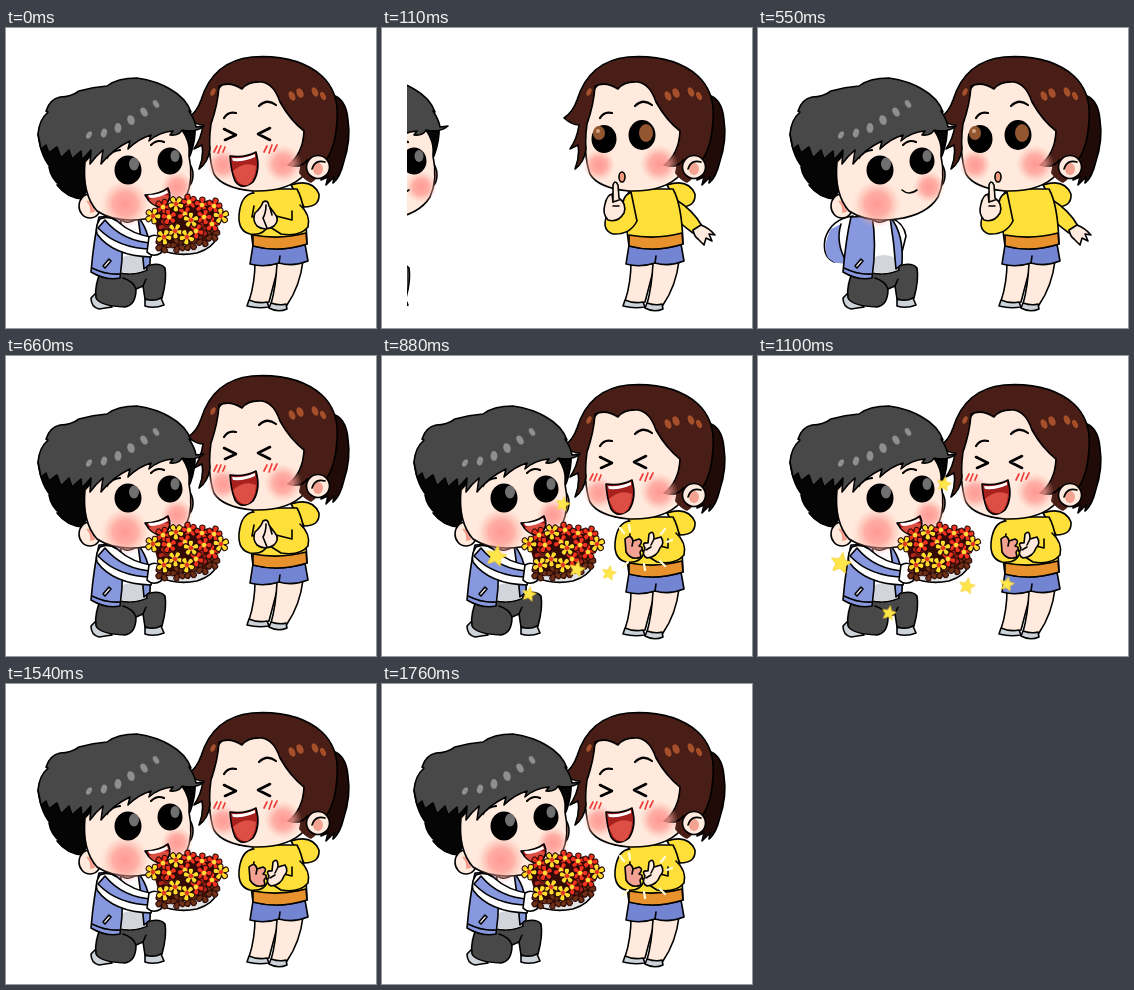
An HTML page for the animation above (1870 ms loop, 370 by 300 pixels).

```html
<!DOCTYPE html>
<html lang="en">
<head>
<meta charset="utf-8">
<title>A bouquet for her</title>
<style>
html, body { margin: 0; width: 100%; height: 100%; overflow: hidden; background: #fff; }
svg { display: block; width: 370px; height: 300px; }
path, ellipse, circle { stroke-linejoin: round; stroke-linecap: round; }
.ink { stroke: #000; stroke-width: 1.6; }
.line { fill: none; stroke: #000; stroke-width: 1.6; }
.bold { fill: none; stroke: #000; stroke-width: 2.2; }
.skin { fill: #ffeadd; }
.blue { fill: #8798df; }
.white { fill: #fff; }
.pants { fill: #484848; }
.shoe { fill: #cdd3d9; }
.yellow { fill: #ffe03b; }
.orange { fill: #e8922e; }
.mouth { fill: #a8211e; }
.tongue { fill: #dd4f45; }
.pink { fill: #f3a191; }

/* 17 poses of 110 ms each */
.ask, .joy, .slide, .hop, .open, .shut, .spark, .ghost { animation: 1.87s step-end infinite; }
.ask { animation-name: ask; }
.joy { animation-name: joy; }
.slide { animation-name: slide; }
.hop { animation-name: hop; }
.open { animation-name: open; }
.shut { animation-name: shut; }
.spark { animation-name: spark; }
.ghost { animation-name: ghost; }
.star { animation: fly 1.87s steps(6) infinite, starTime 1.87s step-end infinite; fill: #ffe64a; }
@keyframes ask { 0%, 35.29% { visibility: hidden; } 5.88% { visibility: visible; } }
@keyframes joy { 0%, 35.29% { visibility: visible; } 5.88% { visibility: hidden; } }
@keyframes slide {
  0%, 29.41% { transform: none; }
  5.88% { transform: translateX(-132px); }
  11.76% { transform: translateX(-99px); }
  17.64% { transform: translateX(-66px); }
  23.52% { transform: translateX(-33px); }
}
@keyframes hop { 0%, 41.17% { transform: none; } 35.29% { transform: translateY(-9px); } }
@keyframes open {
  0%, 41.17%, 52.94%, 64.7%, 76.47%, 88.23% { visibility: hidden; }
  47.05%, 58.82%, 70.58%, 82.35%, 94.11% { visibility: visible; }
}
@keyframes shut {
  0%, 35.29%, 52.94%, 64.7%, 76.47%, 88.23% { visibility: visible; }
  5.88%, 47.05%, 58.82%, 70.58%, 82.35%, 94.11% { visibility: hidden; }
}
@keyframes spark {
  0%, 52.94%, 76.47% { visibility: hidden; }
  47.05%, 70.58%, 94.11% { visibility: visible; }
}
@keyframes ghost { 0%, 76.47% { visibility: hidden; } 70.58% { visibility: visible; } }
@keyframes starTime { 0%, 70.58% { visibility: hidden; } 41.17% { visibility: visible; } }
@keyframes fly {
  0%, 35.29% { transform: none; }
  70.58%, 100% { transform: translate(var(--dx), var(--dy)); }
}
</style>
</head>
<body>
<svg viewBox="0 0 370 300">
  <defs>
    <radialGradient id="blush">
      <stop offset="0" stop-color="#ff8f8a" stop-opacity=".9"/>
      <stop offset=".5" stop-color="#ff9b94" stop-opacity=".75"/>
      <stop offset="1" stop-color="#ffb5a8" stop-opacity="0"/>
    </radialGradient>
    <clipPath id="edge"><path d="M25 0H370V300H25Z"/></clipPath>
    <path id="star" d="M0-8 2.3-2.8 8-2.2 3.8 1.5 5 7 0 4.2-5 7-3.8 1.5-8-2.2-2.3-2.8Z"/>
  </defs>

  <g class="hop">
    <!-- girl: ponytail, legs -->
    <path class="ink" fill="#210b08" d="M326 67Q340 70 342 92Q345 112 338 133Q334 150 327 155L328 149L320 157L322 149L315 152Q321 142 318 122Z"/>
    <path class="ink skin" d="M249 234Q249 255 243 273Q252 279 263 274L273 236Z"/>
    <path class="ink skin" d="M271 235Q270 258 265 276Q273 281 281 277Q294 258 297 233Z"/>
    <path class="ink shoe" d="M243 272Q252 276 261 274L263 279Q252 281 241 278Z"/>
    <path class="ink shoe" d="M265 275Q274 278 280 276L281 281Q272 285 263 280Z"/>
    <path class="ink" fill="#7284d2" d="M247 217L299 216L302 233Q287 239 273 235Q258 240 244 236Z"/>
    <path class="line" d="M273 235L274 228"/>
    <!-- hoodie -->
    <path class="ink yellow" d="M285 157Q306 150 313 166Q314 179 298 179Z"/>
    <g class="ask">
      <path class="ink yellow" d="M293 171Q311 182 320 198L311 205Q300 197 293 190Z"/>
      <path class="ink skin" d="M311 202L319 197Q327 200 333 207L327 206L330 213L324 210L322 217L316 211Q312 208 311 202Z"/>
    </g>
    <path class="ink yellow" d="M247 161L291 161Q300 177 301 216Q273 225 247 218Q242 190 247 161Z"/>
    <path class="ink orange" d="M247 207Q274 212 300 205L301 216Q273 225 247 218Z"/>
    <!-- head -->
    <path class="ink skin" d="M204 92Q201 126 208 146Q216 160 247 163Q283 164 299 146L303 90Q280 44 240 46Q205 50 204 92Z"/>
    <path d="M296 128L318 126L309 152L305 155Q298 152 293 145Z" fill="#481e16"/>
    <path class="ink" fill="#481e16" d="M182 90Q191 84 195 72Q207 33 246 29Q291 26 316 48Q333 64 331 91Q330 118 320 132L301 132Q296 141 282 137Q297 126 298 103Q284 92 274 74Q268 56 256 54Q242 53 236 61Q224 53 213 58Q212 76 205 96Q203 110 204 121Q202 135 193 141Q198 129 196 117L188 121Q195 111 197 97Q190 97 182 90Z"/>
    <ellipse class="ink skin" cx="312" cy="139" rx="11.5" ry="11.5"/>
    <ellipse class="pink" cx="312" cy="141" rx="5" ry="6"/>
    <path class="line" d="M306 141Q309 131 319 134"/>
    <g fill="#a5502b">
      <ellipse cx="207" cy="64" rx="2.2" ry="4" transform="rotate(25 207 64)"/>
      <ellipse cx="286" cy="68" rx="3" ry="5" transform="rotate(-25 286 68)"/>
      <ellipse cx="294" cy="65" rx="3.3" ry="5" transform="rotate(-25 294 65)"/>
      <ellipse cx="309" cy="64" rx="3" ry="5" transform="rotate(-25 309 64)"/>
      <ellipse cx="317" cy="68" rx="2.5" ry="4.5" transform="rotate(-25 317 68)"/>
    </g>
    <path class="bold" d="M218 90Q222 83 230 85M253 78Q261 70 270 77"/>
    <circle cx="217" cy="137" r="16" fill="url(#blush)"/>
    <circle cx="277" cy="136" r="19" fill="url(#blush)"/>

    <g class="ask">
      <ellipse cx="222" cy="111" rx="12.5" ry="14"/>
      <ellipse cx="260" cy="107" rx="13.5" ry="15"/>
      <ellipse cx="217" cy="105" rx="6" ry="7" fill="#925630"/>
      <ellipse cx="264" cy="105" rx="7" ry="9" fill="#925630"/>
      <circle cx="216" cy="103" r="2" fill="#d5a27c"/>
      <ellipse class="ink" cx="240" cy="149" rx="3" ry="5" fill="#f09a7e"/>
      <path class="ink yellow" d="M249 164Q239 169 241 181L225 187Q219 202 231 206Q248 207 255 193Z"/>
      <path class="ink skin" d="M231 174L231 157Q233 151 236 157L237 170Q245 176 242 185Q236 195 226 192Q220 186 223 176Q225 167 230 166Z"/>
      <path class="line" d="M231 174L237 172M231 178L237 178"/>
    </g>

    <g class="joy">
      <path d="M208 124L211 118M212 125L215 118M217 124L219 119M258 124L261 118M263 125L266 117M268 123L271 117" fill="none" stroke="#ef3f3a" stroke-width="1.7"/>
      <path class="bold" style="stroke-width:2.6" d="M218 101L230 107L219 112M264 100L252 106L264 112"/>
      <path class="ink mouth" d="M224 128Q239 130 250 124Q255 142 247 154Q236 163 229 153Q225 143 224 128Z"/>
      <path class="tongue" d="M227 143Q238 133 250 138Q249 153 242 157Q232 159 227 143Z"/>
      <path fill="#fff" d="M226 130Q239 131 249 126L249 129Q239 134 227 133Z"/>
      <path class="ink yellow" d="M248 165Q235 166 233 187Q232 203 244 206Q258 208 262 197L255 186L246 189L248 178"/>
      <path class="ink yellow" d="M294 177Q305 187 302 199Q294 209 275 206L264 199L270 188L286 192L286 183"/>
      <g class="shut">
        <path class="ink skin" d="M249 185Q255 180 257 174Q262 171 263 178L269 186Q274 192 268 198Q259 204 251 198Q246 192 249 185Z"/>
        <path class="line" d="M260 177Q260 185 257 190M257 190L261 200M264 180L266 187"/>
      </g>
      <g class="open">
        <path class="ink pink" d="M243 183Q249 177 251 185L257 183Q262 185 257 190Q263 191 258 196L259 201Q249 205 244 196Z"/>
        <path class="ink skin" d="M267 178Q272 173 272 183L279 181Q283 187 278 192Q275 201 265 202Q259 199 263 192Q259 186 266 187Z"/>
        <path class="line" d="M251 185L250 190M269 189L272 183M264 194L269 191"/>
      </g>
      <path class="spark" d="M242 177L238 172M248 175L247 169M279 178L283 173M285 186L290 184M246 206L241 211M262 208L263 214M278 205L283 210" stroke="#fffbd2" stroke-width="2.3"/>
    </g>
  </g>

  <g clip-path="url(#edge)"><g class="slide">
    <!-- boy: legs -->
    <path class="ink shoe" d="M91 264L85 270Q85 279 93 281L106 279Z"/>
    <path class="ink pants" d="M96 241Q88 257 90 270Q94 278 119 279Q130 277 130 261L137 258L139 271Q148 275 156 270Q161 252 159 240Q153 233 138 239L115 239Z"/>
    <path class="line" d="M130 261Q127 253 117 250M137 258L140 251"/>
    <path class="ink shoe" d="M139 271Q148 274 155 270L158 277Q148 281 139 278Z"/>
    <g class="ask">
      <path class="ink white" d="M95 188Q73 191 67 211Q64 229 76 234L94 235Z"/>
      <path class="blue" d="M73 201Q64 218 70 230L77 235L89 235Q77 217 83 196Z"/>
      <path class="line" d="M83 196Q77 215 89 235"/>
      <path class="ink white" d="M133 190Q146 195 148 208L144 224L133 224Z"/>
    </g>
    <path class="ink white" d="M111 188L134 188L141 242Q128 248 114 245Z"/>
    <path fill="#d4d5dc" d="M115 230Q125 224 138 230L140 242Q128 247 115 244Z"/>
    <path class="ink blue" d="M93 189L114 188Q119 215 114 250Q100 253 85 244Q88 210 93 189Z"/>
    <path class="ink blue" d="M132 189Q146 205 144 236L138 241Q136 214 132 189Z"/>
    <path class="white ink" d="M97 238L103 231L105 233L99 240Z"/>
    <path class="line" d="M86 240Q100 247 114 246"/>
    <path class="ink pink" d="M112 188Q120 200 133 189Z"/>
    <!-- head -->
    <path class="ink" fill="#050505" d="M32 106L97 112Q82 128 80 145Q83 160 77 171Q61 170 51 157L55 158Q45 151 43 139L47 142Q35 131 32 106Z"/>
    <ellipse class="ink skin" cx="84" cy="178" rx="11" ry="12"/>
    <path class="pink" d="M80 173Q89 171 89 184L84 185Q85 178 80 173Z"/>
    <ellipse class="ink pink" cx="182" cy="147" rx="5" ry="11"/>
    <path class="ink skin" d="M79 134Q76 166 91 183Q109 195 139 191Q169 187 180 169Q188 151 183 128L184 96L110 100Z"/>
    <circle cx="119" cy="176" r="24" fill="url(#blush)"/>
    <circle cx="171" cy="159" r="16" fill="url(#blush)"/>
    <ellipse cx="122" cy="142" rx="13.5" ry="14.5"/>
    <ellipse cx="164" cy="133" rx="12.5" ry="13.5"/>
    <ellipse cx="128" cy="136" rx="5" ry="6.5" fill="#6f6f6f"/>
    <ellipse cx="169" cy="128" rx="4.5" ry="6" fill="#6f6f6f"/>
    <path class="ask line" d="M144 162Q151 168 159 162"/>
    <g class="joy">
      <path class="ink mouth" d="M139 167Q153 167 162 160Q167 171 158 178Q147 181 139 167Z"/>
      <path class="tongue" d="M143 172Q152 165 163 168Q161 178 154 178Q148 178 143 172Z"/>
      <path fill="#fff" d="M142 167Q153 167 161 162L162 165Q153 170 144 170Z"/>
    </g>
    <path class="bold" d="M101 130Q105 123 114 122M145 117Q151 111 158 114"/>
    <path class="ink" fill="#050505" d="M176 98L189 97Q190 112 184 128Q184 113 176 102Z"/>
    <path class="ink" fill="#484848" d="M32 106Q33 92 42 84L40 83Q44 71 54 69Q65 69 73 63Q87 59 101 58Q111 50 131 50Q151 53 164 61Q180 70 185 84L183 83Q189 92 190 99L198 98Q190 105 176 102Q173 108 164 107L167 103Q153 104 143 113L145 107Q132 111 122 121L124 113Q107 121 95 136L97 122Q89 129 84 136L85 122L76 132L75 123L66 131L63 122L55 130L51 119L43 125L40 117L35 121Z"/>
    <g fill="#8f8f8f">
      <ellipse cx="83" cy="107" rx="2.5" ry="4" transform="rotate(30 83 107)"/>
      <ellipse cx="98" cy="105" rx="3" ry="4.5" transform="rotate(15 98 105)"/>
      <ellipse cx="112" cy="100" rx="3.4" ry="5"/>
      <ellipse cx="125" cy="92" rx="3.6" ry="5" transform="rotate(-20 125 92)"/>
      <ellipse cx="138" cy="84" rx="3.2" ry="4.8" transform="rotate(-30 138 84)"/>
      <ellipse cx="150" cy="76" rx="2.6" ry="4.2" transform="rotate(-35 150 76)"/>
    </g>
    <!-- offering arm and bouquet -->
    <g class="joy">
      <path class="ink white" d="M94 191Q89 198 91 206Q107 228 145 229L150 210Q126 207 111 193Q102 187 94 191Z"/>
      <path class="ink blue" d="M99 192Q117 214 148 215L147 221Q112 221 92 200Z"/>
      <path class="ink white" d="M143 209Q151 204 157 213L155 225Q147 230 141 224Z"/>
      <path class="ink" fill="#e2e2e5" d="M157 213L211 209Q207 220 191 225Q170 229 153 221Z"/>
      <path fill="#350b06" d="M147 188Q160 173 182 173Q207 173 214 187Q213 203 199 209Q180 220 155 216Z"/>
      <g id="bouquet"></g>
    </g>
  </g></g>
  <g id="stars"></g>
  <g class="ghost" fill="#b98a55" opacity=".75">
    <use href="#star" x="122" y="267"/><use href="#star" x="260" y="235" opacity=".5"/>
  </g>
</svg>
<script>
const add = (parent, name, attrs) => {
  const node = document.createElementNS("http://www.w3.org/2000/svg", name);
  for (const key in attrs) node.setAttribute(key, attrs[key]);
  return parent.appendChild(node);
};

const petals = Array.from({ length: 5 }, (_, i) => {
  const at = (turn, r) => {
    const a = (i + turn) * Math.PI * 0.4 - Math.PI / 2;
    return `${(r * Math.cos(a)).toFixed(1)} ${(r * Math.sin(a)).toFixed(1)}`;
  };
  return `${i ? "" : "M" + at(-0.5, 3)}Q${at(-0.4, 9)} ${at(0, 8)}Q${at(0.4, 9)} ${at(0.5, 3)}`;
}).join("") + "Z";

// petal and centre colours
const tints = {
  r: ["#f0321f", "#ffda36"], y: ["#ffdd2e", "#e2391e"], d: ["#b3261a", "#5f1b12"], b: ["#6e3018", "#3a120a"],
};
const flowers = "b172,217 b184,215 b197,211 b206,206 d160,198 d196,201 b157,217 " +
  "r157,179 r183,174 r196,177 r208,178 r163,189 r179,186 r206,196 r190,203 r198,189 " +
  "y147,188 y170,176 y185,192 y215,188 y169,203 y158,209 y181,209";
const bouquet = document.getElementById("bouquet");
for (const flower of flowers.split(" ")) {
  const [x, y] = flower.slice(1).split(",");
  const [petal, centre] = tints[flower[0]];
  const g = add(bouquet, "g", { transform: `translate(${x} ${y}) rotate(${x * 7 % 72})` });
  add(g, "path", { d: petals, fill: petal, stroke: "#2a0904", "stroke-width": 1.1 });
  add(g, "circle", { r: 2.3, fill: centre });
}

// start x, y, travel x, y, size
const stars = [
  [145, 193, -93, 21, 1.3], [163, 219, -48, 57, 0.9], [176, 168, 15, -60, 0.9],
  [181, 196, 42, 51, 1], [205, 206, 66, 33, 0.9],
];
for (const [x, y, dx, dy, size] of stars) {
  const g = add(document.getElementById("stars"), "g", { class: "star", style: `--dx:${dx}px;--dy:${dy}px` });
  add(g, "use", { href: "#star", transform: `translate(${x} ${y}) rotate(12) scale(${size})`, stroke: "#f4cf35", "stroke-width": 0.7 });
}
</script>
</body>
</html>
```
